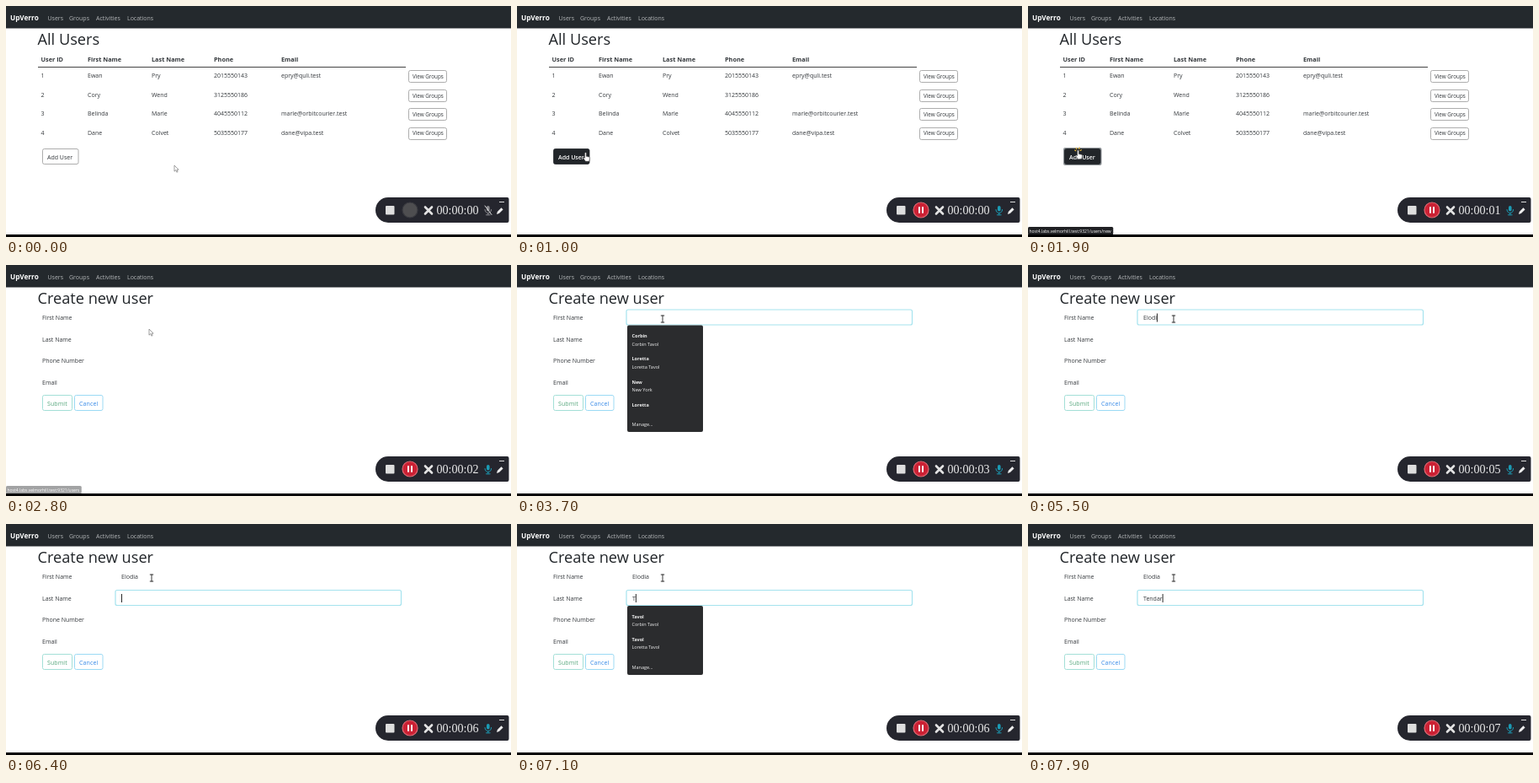
These frames come from a looping animation (600 by 274 pixels, 8 s). An HTML page:

```html
<!DOCTYPE html>
<html lang="en">
<head>
<meta charset="utf-8">
<style>
  html, body { margin: 0; height: 100%; overflow: hidden; background: #fff; }
  svg { display: block; width: 600px; height: 274px; font: 7px "Open Sans", "Noto Sans", sans-serif; fill: #33373b; }
  .line { fill: none; stroke-linecap: round; stroke-linejoin: round; }
  .head { font-size: 18.2px; fill: #212529; }
  .bold { font-weight: 700; }
  .off { display: none; }
</style>
</head>
<body>
<svg id="stage" viewBox="0 0 600 274">
  <g id="list"></g>
  <g id="form"></g>
  <g id="nav"></g>
  <g id="status"><rect y="262" height="9.5" rx="1.5" fill="#202124"/><text x="1.5" y="268.7" font-size="5" fill="#fff"></text></g>
  <rect y="271" width="600" height="3" fill="#000"/>
  <g id="recorder">
    <path d="M454 227H595.500a2 2 0 0 1 2 2V255a2 2 0 0 1-2 2H454a15 15 0 0 1 0-30z" fill="#25262e"/>
    <rect x="451" y="237" width="10.500" height="10.500" rx="1" fill="#dedede"/>
    <circle id="record" cx="480" cy="242" r="9" stroke-width="1.200"/>
    <path id="pause" class="line" d="M478 239v6M482 239v6" stroke="#fff" stroke-width="2"/>
    <path class="line" d="M498 238.500l8 8m0-8l-8 8" stroke="#e4e4e4" stroke-width="2.600"/>
    <text id="timer" x="511.500" y="246.700" style="font:14.100px 'Liberation Serif',serif" fill="#ececec"></text>
    <g id="mic" class="line">
      <rect x="571" y="237" width="3.600" height="6.500" rx="1.800" fill="currentColor"/>
      <path d="M569 241.500c0 5.500 7.600 5.500 7.600 0M572.800 245.600v2.200M570.500 247.800h4.600" stroke="currentColor"/>
      <path id="muted" d="M569 237l8 10.500" stroke="#ddd"/>
    </g>
    <path d="M583 247l.8-3 4.700-4.700 2.100 2.100-4.700 4.700z" fill="#eee"/>
    <path d="M586 232.500h6" stroke="#ddd"/>
  </g>
  <g id="cursor">
    <path id="arrow" d="M0 0v7.200l1.700-1.600 1.200 2.600 1.200-.6-1.200-2.400h2.200z" fill="#fff" stroke="#777" stroke-width=".7"/>
    <path id="ibeam" class="line" d="M-1.800-4h3.600M0-4v8M-1.800 4h3.600" stroke="#222" stroke-width=".9"/>
    <g id="hand">
      <path d="M-.9.5q.9-1.200 1.800 0v4l3.300.8q1 .3.800 1.500L4.300 10.500H0L-2.700 6.800q0-1.500 1.800-.3z" fill="#fff" stroke="#333" stroke-width=".5"/>
      <path id="spark" class="line" d="M-2.600.8l-1.300-.8M-1.600-1.200l-.9-1.500M1-1.600l.8-1.600M2.400.5l1.600-.8" stroke="#e9b93c" stroke-width="1.100"/>
    </g>
  </g>
</svg>
<script>
const LOOP = 8000, STEP = 100;
const $ = id => document.getElementById(id);
const show = (id, on) => $(id).classList.toggle('off', !on);
const attr = (id, values) => { for (const k in values) $(id).setAttribute(k, values[k]); };
const text = (x, y, s, extra = '') => `<text x="${x}" y="${y}" ${extra}>${s}</text>`;
const box = (x, y, w, h, extra) => `<rect x="${x}" y="${y}" width="${w}" height="${h}" rx="2" ${extra}/>`;

const HOST = 'host4.labs.velmorhill.test:9321/users';
const ADD = [43.5, 169.5, 42.5, 18], CANCEL = [81.5, 154.5, 33.5, 18];
const FIELDS = [
  { y: 53, word: 'Elodia', focus: 3200, blur: 6300, keys: [4400, 5200, 5300, 5400, 5500, 5800], menu: [3400, 4500],
    items: [['Corbin', 'Corbin Tavol'], ['Loretta', 'Loretta Tavol'], ['New', 'New York'], ['Loretta']], manage: 119 },
  { y: 78.5, word: 'Tendar', focus: 6300, blur: LOOP, keys: [7000, 7300, 7600, 7800, 7800, 7900], menu: [7100, 7400],
    items: [['Tavol', 'Corbin Tavol'], ['Tavol', 'Loretta Tavol']], manage: 74.5 },
];
const PATH = [[100, 200, 189], [1300, 59.5, 171], [2100, 59.5, 171], [2400, 98, 162], [2800, 170, 76], [3200, 173, 64]];

function buildList() {
  const columns = [41.5, 97, 173, 247, 327];
  const cells = (row, y, extra) => row.map((s, i) => text(columns[i], y, s, extra)).join('');
  const rows = [
    ['1', 'Ewan', 'Pry', '2015550143', 'epry@quli.test'],
    ['2', 'Cory', 'Wend', '3125550186', ''],
    ['3', 'Belinda', 'Marle', '4045550112', 'marle@orbitcourier.test'],
    ['4', 'Dane', 'Colvet', '5035550177', 'dane@vipa.test'],
  ];
  $('list').innerHTML = text(37.5, 46, 'All Users', 'class="head"')
    + cells(['User ID', 'First Name', 'Last Name', 'Phone', 'Email'], 65.5, 'class="bold" style="font-size:7.3px"')
    + '<path d="M38 72.500H475" stroke="#444"/>'
    + rows.map((row, i) => {
      const y = 85.3 + i * 22.4;
      return cells(row, y) + box(478.5, Math.round(y - 9) + .5, 45, 14, 'fill="#fff" stroke="#999" stroke-width=".8"')
        + text(483, y + .9, 'View Groups', 'font-size="6.3"');
    }).join('')
    + box(42, 168, 45.5, 21, 'id="ring" fill="#8d9296"')
    + box(...ADD, 'id="add" stroke-width=".8"') + text(49, 181.5, 'Add User', 'id="addText"');
}

function buildForm() {
  const labels = ['First Name', 'Last Name', 'Phone Number', 'Email'];
  const menu = ({ y, items, manage }, i) => {
    const top = y + 18.5;
    return `<g id="menu${i}" fill="#f4f4f4" font-size="5.5">`
      + box(131, top, 90, manage + 7.5, 'fill="#2b2c2e"')
      + items.map(([title, detail = ''], n) => text(136.5, top + 14.5 + n * 27.3, title, 'class="bold"')
        + text(136.5, top + 24 + n * 27.3, detail)).join('')
      + text(136.5, top + manage, 'Manage...') + '</g>';
  };
  $('form').innerHTML = text(37.5, 46, 'Create new user', 'class="head"')
    + labels.map((s, i) => text(43, 65.2 + i * 25.5, s)).join('')
    + box(43.5, 154.5, 35, 18, 'fill="#fff" stroke="#a3dfd7"') + text(49, 166.7, 'Submit', 'fill="#55a67c" letter-spacing=".1"')
    + box(...CANCEL, 'id="cancel" stroke="#9bdaf4"') + text(87, 166.7, 'Cancel', 'id="cancelText" letter-spacing=".15"')
    + FIELDS.map((f, i) => box(130, f.y, 339.5, 18, `id="field${i}" fill="#fff" stroke="#a5e3ee" stroke-width="1.2"`)
      + text(137, f.y + 12.2, '', `id="value${i}"`)
      + `<rect id="caret${i}" y="${f.y + 4.5}" width=".9" height="10" fill="#111"/>`).join('')
    + FIELDS.map(menu).join('');
}

function buildNav() {
  $('nav').innerHTML = '<rect width="600" height="26.500" fill="#24292d"/>'
    + text(5, 17, 'UpVerro', 'class="bold" style="font-size:8.2px" fill="#fff"')
    + [[49.5, 'Users'], [75, 'Groups'], [107, 'Activities'], [144, 'Locations']]
      .map(([x, s]) => text(x, 16.5, s, 'fill="#b4b7b9"')).join('');
}

function pointer(t) {
  const next = PATH.findIndex(p => p[0] > t);
  if (next < 1) return (next ? PATH[PATH.length - 1] : PATH[0]).slice(1);
  const [a, b] = [PATH[next - 1], PATH[next]];
  const k = (t - a[0]) / (b[0] - a[0]), e = k * k * (3 - 2 * k);
  return [a[1] + (b[1] - a[1]) * e, a[2] + (b[2] - a[2]) * e];
}

const inside = ([px, py], [x, y, w, h]) => px >= x && px <= x + w && py >= y && py <= y + h;

function drawField(f, i, t) {
  const typed = f.keys.filter(k => k <= t);
  const focused = t >= f.focus && t < f.blur;
  const last = typed.length ? typed[typed.length - 1] : f.focus;
  $('value' + i).textContent = f.word.slice(0, typed.length);
  show('field' + i, focused);
  show('caret' + i, focused && (t - last) % 1000 < 500);
  show('menu' + i, t >= f.menu[0] && t < f.menu[1]);
  if (focused) attr('caret' + i, { x: 137 + (typed.length && $('value' + i).getComputedTextLength()) });
}

function drawStatus(t) {
  const opacity = t < 1300 ? 0 : t < 2100 ? 1 : t < 2300 ? 0 : Math.max(0, Math.min(1, (2870 - t) / 170));
  attr('status', { opacity });
  const [bar, label] = $('status').children;
  label.textContent = HOST + (t < 2100 ? '/new' : '');
  bar.setAttribute('width', label.getComputedTextLength() + 4);
}

function draw(t) {
  const onList = t < 2100, recording = t >= 200, at = pointer(t);
  const overAdd = onList && inside(at, ADD), overCancel = !onList && inside(at, CANCEL);
  const overField = !onList && inside(at, [130, 53, 340, 18]);

  show('list', onList);
  show('form', !onList);
  show('ring', onList && t >= 1800);
  attr('add', { fill: overAdd ? '#212529' : '#fff', stroke: overAdd ? '#212529' : '#999' });
  attr('addText', { fill: overAdd ? '#fff' : '#33373b', 'font-weight': overAdd ? 600 : 400 });
  attr('cancel', { fill: overCancel ? '#2f86ee' : '#fff' });
  attr('cancelText', { fill: overCancel ? '#fff' : '#3488e6' });
  FIELDS.forEach((f, i) => drawField(f, i, t));
  drawStatus(t);

  attr('record', recording ? { fill: '#cb2134', stroke: '#e06a74' } : { fill: '#4e4e50', stroke: '#3a3b40' });
  show('pause', recording);
  show('muted', !recording);
  $('mic').style.color = recording ? '#1b9bb4' : '#8b8b90';
  $('timer').textContent = '00:00:0' + Math.max(0, Math.floor((t - 200) / 1000));

  attr('cursor', { transform: `translate(${at})` });
  show('hand', overAdd || overCancel);
  show('ibeam', overField);
  show('arrow', !(overAdd || overCancel || overField));
  show('spark', t >= 1800 && t < 2100);
}

buildList();
buildForm();
buildNav();
let shown = -1;
function tick() {
  const t = Math.floor(performance.now() % LOOP / STEP) * STEP;
  if (t !== shown) draw(shown = t);
  requestAnimationFrame(tick);
}
tick();
</script>
</body>
</html>
```
